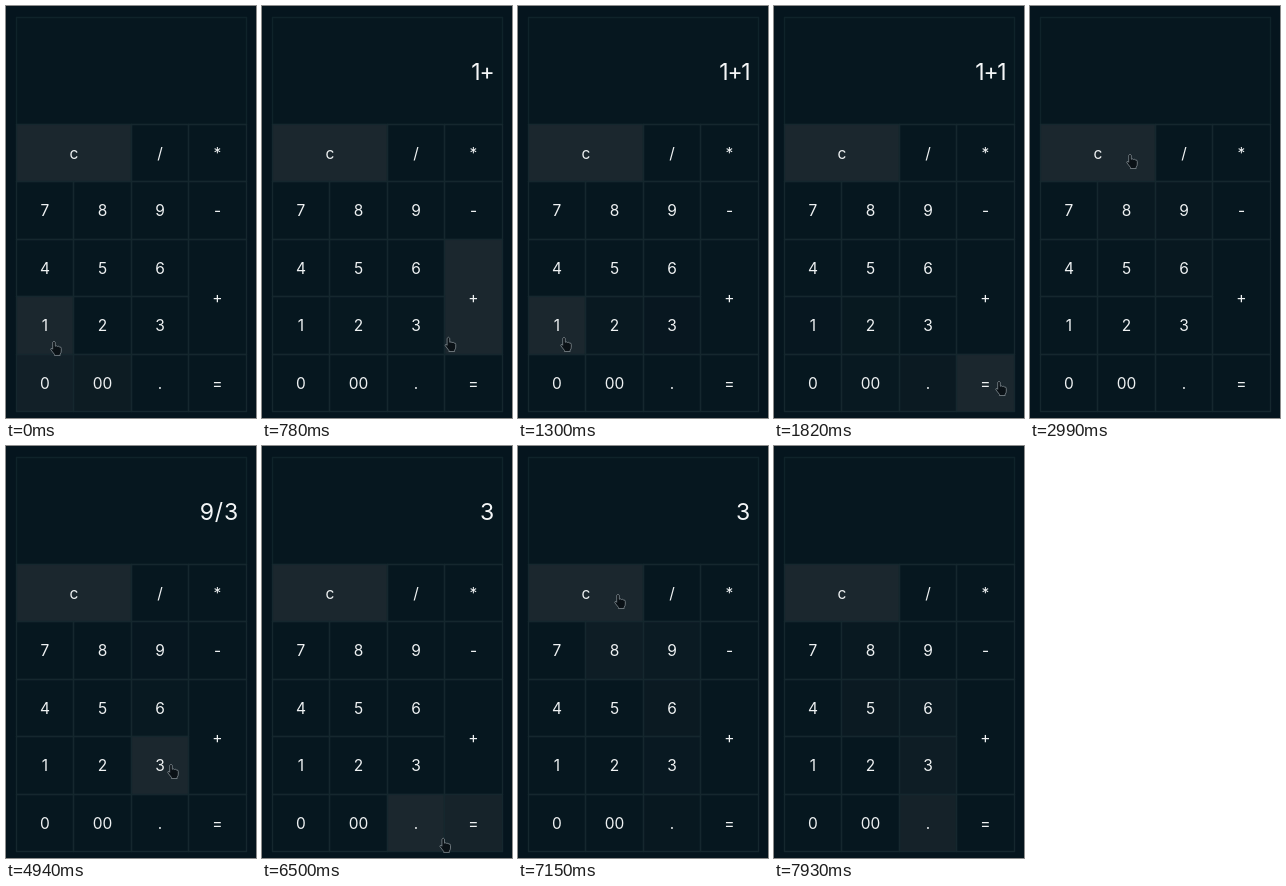
These frames come from a looping animation (250 px wide and 412 px high, 8000 ms). An HTML page with a canvas:

```html
<!DOCTYPE html>
<html lang="en">
<meta charset="utf-8">
<title>Calculator</title>
<style>
  html, body { margin: 0; width: 100%; height: 100%; overflow: hidden; background: #05151e; }
  canvas { display: block; }
</style>
<canvas id="stage" width="250" height="412"></canvas>
<script>
const ctx = document.getElementById('stage').getContext('2d');
const LOOP = 8000, STEP = 130;
const TRAVEL = 500, REST = 200, FADE = 160;
const FONT = 'Inter, Lato, sans-serif';

// Each letter fills one cell; equal letters side by side merge into one key
const layout = ['cc/*', '789-', '456+', '123+', '0d.='];
const keys = [...new Set(layout.join(''))].map(label => {
  const row = layout.findIndex(r => r.includes(label));
  const col = layout[row].indexOf(label);
  const cols = layout[row].lastIndexOf(label) - col + 1;
  const rows = layout.filter(r => r.includes(label)).length;
  const x = colX(col), y = rowY(row);
  return {
    label: label === 'd' ? '00' : label, x, y,
    w: colX(col + cols) - x, h: rowY(row + rows) - y
  };
});

// Pointer stops: time, x, y, pressed key
const stops = [
  [-440, 96, 430], [260, 46, 331, '1'], [650, 222, 331, '+'], [1300, 46, 331, '1'],
  [1950, 225, 375, '='], [2990, 100, 148, 'c'], [3640, 160, 205, '9'],
  [4290, 150, 146, '/'], [4940, 165, 318, '3'], [5850, 224, 375, '='],
  [6720, 181, 392], [7280, 100, 148, 'c'], [8140, 150, 416]
];

const hand = new Path2D('M-1.5 1.5q1.5-2.5 3 0v4.5q1.5-1 2.6.3q1.5-.8 2.4.6' +
  'q1.8-.3 1.8 1.6v3q0 2-1.3 3.5v1.5h-6.5v-1.2l-4.2-5.5q-.3-1.8 1.8-1l.4.6z');

function colX(i) { return Math.round(10 + 57.4 * i) + .5; }
function rowY(i) { return Math.round(118 + 57.4 * i) + .5; }

function pointer(t) {
  const i = Math.max(1, stops.findIndex(s => s[0] >= t));
  const [t0, x0, y0] = stops[i - 1], [t1, x1, y1] = stops[i];
  const end = t1 - REST, begin = Math.max(t0, end - TRAVEL);
  const u = Math.min(1, Math.max(0, (t - begin) / (end - begin)));
  const s = u * u * (3 - 2 * u);
  return [x0 + (x1 - x0) * s, y0 + (y1 - y0) * s];
}

function evaluate(sum) {
  const [, a, op, b] = sum.match(/(\d+)(\D)(\d+)/);
  return String({ '+': +a + +b, '/': a / b }[op]);
}

function readout(t) {
  return stops.filter(s => s[3] && s[0] <= t).reduce((text, [, , , key]) =>
    key === 'c' ? '' : key === '=' ? evaluate(text) : text + key, '');
}

// Full while hovered, then fading out after the pointer leaves
function glow(key, t) {
  if (key.label === 'c') return 1;
  for (let age = 0; age < 3 * FADE; age += 10) {
    const [x, y] = pointer(t - age);
    if (x >= key.x && x < key.x + key.w && y >= key.y && y < key.y + key.h) return Math.exp(-age / FADE);
  }
  return 0;
}

function drawKey(key, t) {
  const { label, x, y, w, h } = key;
  ctx.fillStyle = `rgba(27, 39, 46, ${glow(key, t)})`;
  ctx.fillRect(x, y, w, h);
  ctx.strokeStyle = '#15272e';
  ctx.strokeRect(x, y, w, h);
  ctx.fillStyle = '#eef1f2';
  ctx.font = `400 15.5px ${FONT}`;
  ctx.fillText(label, x + w / 2, y + h / 2 + 5.5);
}

// Right-aligned, with a narrow 1
function drawReadout(text) {
  ctx.fillStyle = '#f4f6f7';
  ctx.font = `400 23px ${FONT}`;
  let x = 232;
  for (const ch of [...text].reverse()) {
    const w = ch === '1' ? 8 : ch === '/' ? 10 : 14;
    ctx.fillText(ch, x - w / 2, 73.5);
    x -= w;
  }
}

function drawHand(x, y) {
  ctx.save();
  ctx.translate(x, y);
  ctx.scale(.88, .88);
  ctx.fillStyle = '#0a1116';
  ctx.fill(hand);
  ctx.strokeStyle = '#8f999e';
  ctx.lineWidth = .8;
  ctx.stroke(hand);
  ctx.restore();
}

function draw(now) {
  const t = Math.floor(now % LOOP / STEP) * STEP;
  ctx.fillStyle = '#05151e';
  ctx.fillRect(0, 0, 250, 412);
  ctx.fillStyle = '#06171f';
  ctx.fillRect(10.5, 11.5, 230, 394);
  ctx.textAlign = 'center';
  ctx.lineWidth = 1.4;
  ctx.strokeStyle = '#0f232a';
  ctx.strokeRect(10.5, 11.5, 230, 107);
  keys.forEach(key => drawKey(key, t));
  drawReadout(readout(t));
  drawHand(...pointer(t));
}

const start = performance.now();
function tick() {
  draw(performance.now() - start);
  requestAnimationFrame(tick);
}
tick();
</script>
</html>
```
